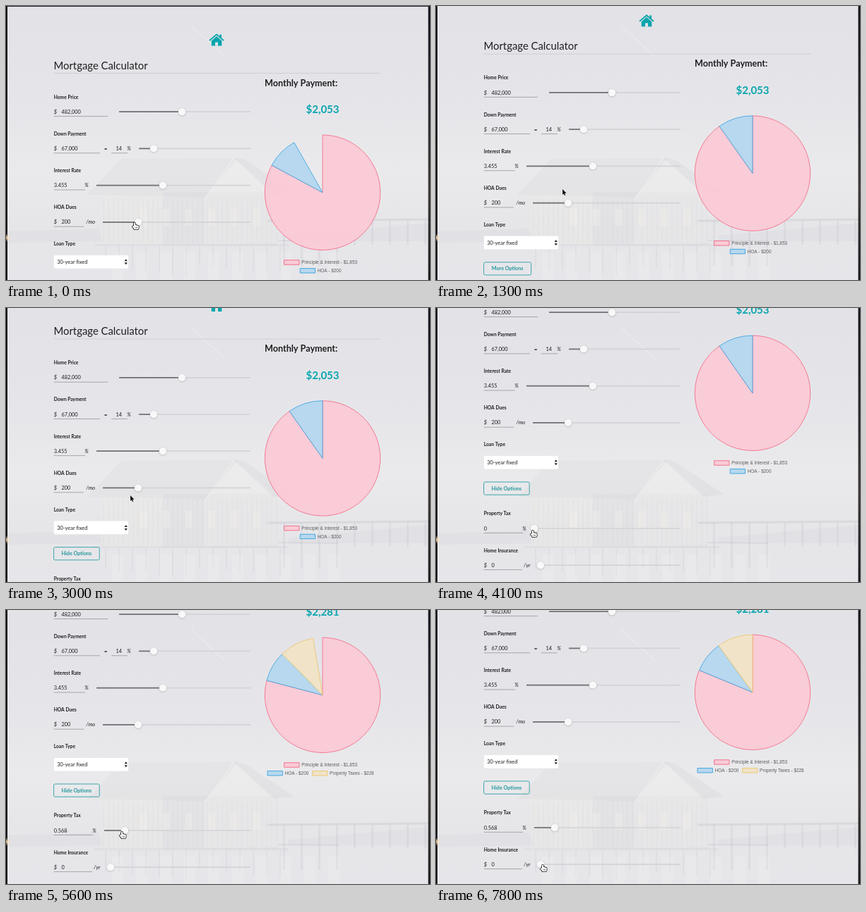
Animation, 600 px wide and 389 px high, one loop 8 s. Source, as an HTML page with a canvas:

```html
<!DOCTYPE html>
<html lang="en">
<head>
<meta charset="utf-8">
<title>Mortgage Calculator</title>
<style>
html, body { margin: 0; width: 100%; height: 100%; overflow: hidden; background: #e4e4e8; }
canvas { display: block; width: 600px; height: 389px; }
</style>
</head>
<body>
<canvas id="stage"></canvas>
<script>
const W = 600, H = 389, LOOP = 8000, STEP = 100;
const TEAL = '#08a5ae', INK = '#1f1f22';
const TOP = 150.2, PITCH = 52.2, OPTIONS_TOP = 457;
const OPEN_AT = 2300;
const PRICE = 482000, LOAN = 1853, DUES = 200;
const canvas = document.getElementById('stage');
const ratio = window.devicePixelRatio || 1;
canvas.width = W * ratio;
canvas.height = H * ratio;
const ctx = canvas.getContext('2d');

// Progress from 0 to 1 between two times
const ramp = (t, from, to) => Math.min(1, Math.max(0, (t - from) / (to - from)));
const mix = (a, b, k) => a + (b - a) * k;
const money = n => '$' + n.toLocaleString('en-US');

const scrollAt = t => 51.4 * ramp(t, 770, 1770) + 92.6 * ramp(t, 3000, 3300) + 4 * ramp(t, 6500, 6700);

function rateAt(t) {
  const r = .384 * ramp(t, 4400, 4767) + .184 * ramp(t, 4900, 5003);
  return Number((Math.round(r / .008) * .008).toFixed(3));
}

// The chart spins in again after every change of the tax rate
const spinStart = t => t <= 4400 ? -465 : Math.min(t - 40, t <= 4900 ? 4767 : 5003);

function pointerAt(t) {
  let p = [182, 308];
  const go = (from, to, x, y) => {
    const k = ramp(t, from, to);
    p = [mix(p[0], x, k), mix(p[1], y, k)];
  };
  go(600, 900, 179, 260);
  go(1800, 2200, 104, 349);
  go(2500, 2800, 176, 266);
  go(3500, 4000, 137, 316);
  go(4400, 4767, 154, 316);
  go(4900, 5003, 164, 315);
  go(6200, 7300, 151, 362);
  return p;
}

const overControl = t => t < 650 || (t > 2100 && t < 2600) || (t >= 4000 && t < 6300) || t > 7100;

function paint(fill, stroke, width = 1) {
  if (fill) { ctx.fillStyle = fill; ctx.fill(); }
  if (stroke) { ctx.strokeStyle = stroke; ctx.lineWidth = width; ctx.stroke(); }
}

function poly(points, fill, stroke, width) {
  ctx.beginPath();
  for (let i = 0; i < points.length; i += 2) ctx.lineTo(points[i], points[i + 1]);
  ctx.closePath();
  paint(fill, stroke, width);
}

function line(x1, y1, x2, y2, color, width) {
  ctx.beginPath();
  ctx.moveTo(x1, y1);
  ctx.lineTo(x2, y2);
  paint(null, color, width);
}

function box(x, y, w, h, r, fill, stroke, width) {
  ctx.beginPath();
  ctx.roundRect(x, y, w, h, r);
  paint(fill, stroke, width);
}

function rect(x, y, w, h, fill) {
  ctx.fillStyle = fill;
  ctx.fillRect(x, y, w, h);
}

function text(s, x, y, size, style = '', color = INK, align = 'left', family = 'Lato, sans-serif') {
  ctx.font = `${style} ${size}px ${family}`;
  ctx.fillStyle = color;
  ctx.textAlign = align;
  ctx.fillText(s, x, y);
}

function shade(stops) {
  const g = ctx.createLinearGradient(0, 0, 0, H);
  stops.forEach((c, i) => g.addColorStop(i / (stops.length - 1), c));
  return g;
}

function backdrop() {
  const dark = a => `rgba(150,150,162,${a})`;
  const warm = a => `rgba(244,240,236,${a})`;
  rect(0, 0, W, H, shade(['#e2e2e7', '#e4e4e8', '#e6e6ea', '#eaeaec', '#e6e6e9', '#e6e6ea']));
  line(262, 28, 310, 72, 'rgba(255,255,255,.45)', 1);

  // far shores
  poly([0, 320, 130, 316, 140, 334, 0, 336], dark(.07));
  poly([400, 326, 600, 308, 600, 334, 400, 334], dark(.07));

  // boathouse: walls, roof, gable
  rect(135, 264, 250, 76, dark(.05));
  rect(135, 264, 87, 76, warm(.35));
  poly([281, 274, 322, 216, 385, 270, 385, 336, 281, 338], warm(.25));
  poly([163, 217, 328, 216, 281, 272, 115, 268], dark(.07));
  poly([322, 215, 338, 218, 408, 265, 378, 268], dark(.09));
  line(322, 216, 281, 274, 'rgba(255,255,255,.35)', 1.2);
  for (let x = 138; x < 384; x += 7) line(x, 272, x, 336, dark(.07), 1);
  for (let x = 190; x < 380; x += 32) rect(x, 288, 10, 24, warm(.3));
  rect(125, 338, 275, 3, dark(.09));

  // stilts, jetty and their reflections
  for (let x = 140; x < 400; x += 19) rect(x, 341, 2, 26 + x % 17, dark(.1));
  line(370, 305, W, 303, dark(.17), 3);
  line(385, 333, 470, 334, dark(.14), 2);
  for (let x = 392; x < W; x += 25) rect(x, 305, 3, x < 480 ? 64 : 34, dark(.12));
  for (let x = 150; x < 470; x += 34) rect(x, 350, 16, 39, warm(.2));

  rect(0, 0, 2, H, '#0c0c12');
  rect(597.5, 0, 3, H, shade(['#101018', '#23232b', '#3b3432', '#15151a']));
  const glow = ctx.createRadialGradient(1, 329, 0, 1, 329, 6);
  glow.addColorStop(0, 'rgba(255,226,180,.9)');
  glow.addColorStop(1, 'rgba(255,226,180,0)');
  rect(0, 322, 8, 14, glow);
}

function slider(from, knob, y) {
  line(from, y, 346, y, '#d3d3d7', 1.7);
  line(from, y, knob, y, '#717075', 1.7);
  ctx.save();
  ctx.shadowColor = 'rgba(0,0,0,.28)';
  ctx.shadowBlur = 2 * ratio;
  ctx.shadowOffsetY = .5 * ratio;
  ctx.beginPath();
  ctx.arc(knob, y, 5.2, 0, 7);
  paint('#f8f8f9');
  ctx.restore();
}

const label = (s, y) => text(s, 67.7, y - 18.6, 6.7, 'bold');
const value = (s, x, y, style) => text(s, x, y + 2.6, 7.4, style);
const rule = (x1, x2, y) => line(x1, y + 6.4, x2, y + 6.4, '#8b8b90', .7);

function field(name, y, amount, end, from, knob, unit = '', dollar = true) {
  label(name, y);
  if (dollar) value('$', 67.7, y, 'italic');
  value(amount, dollar ? 78.5 : 67.7, y);
  rule(67.7, end, y);
  value(unit, end + (unit === '/mo' ? 3.5 : unit === '/yr' ? 2.3 : -.8), y, 'italic');
  slider(from, knob, y);
}

function houseIcon(x, y) {
  ctx.lineJoin = 'miter';
  ctx.beginPath();
  ctx.moveTo(x - 10, y + 1);
  ctx.lineTo(x, y - 7.6);
  ctx.lineTo(x + 10, y + 1);
  paint(null, TEAL, 1.9);
  rect(x + 4.4, y - 7.5, 2.6, 5, TEAL);
  poly([x, y - 5, x + 7.3, y + 1.4, x + 7.3, y + 8.5, x - 7.3, y + 8.5, x - 7.3, y + 1.4], TEAL);
  rect(x - 2, y + 3.5, 4, 5.1, '#e3e3e8');
}

function form(t, rate) {
  const open = t >= OPEN_AT;
  rect(0, 0, W, 1, '#25252c');
  houseIcon(298, 48);
  text('Mortgage Calculator', 67.5, 89.6, 14.85);
  line(68, 95.4, 530, 95.4, '#c9c9ce', .8);

  const y = i => TOP + PITCH * i;
  field('Home Price', y(0), '482,000', 144, 160, 249);
  field('Down Payment', y(1), '67,000', 133, 188, 209);
  value('=', 139, y(1), 'bold');
  value('14', 155.5, y(1));
  rule(149, 172, y(1));
  value('%', 171.3, y(1), 'italic');
  field('Interest Rate', y(2), '3.455', 112, 128, 222, '%', false);
  field('HOA Dues', y(3), '200', 110, 137, 187, '/mo');

  label('Loan Type', y(4));
  box(67.5, 353.5, 106, 19.5, 2, '#fff', '#e3e3e6', .6);
  text('30-year fixed', 72.3, 366, 7.4);
  for (const s of [-1, 1]) poly([167.6, 363.3 + s, 169.7, 363.3 + s * 4, 171.8, 363.3 + s], '#222');

  const width = open ? 64.6 : 67;
  box(67.6, 391, width, 18.2, 2, null, '#2a9fa4', .9);
  text(open ? 'Hide Options' : 'More Options', 67.6 + width / 2, 402.7, 7.2, 'bold', '#23979c', 'center');
  if (!open) return;
  field('Property Tax', OPTIONS_TOP, String(rate), 123, 139, 139 + rate * 51, '%', false);
  field('Home Insurance', OPTIONS_TOP + PITCH, '0', 122, 148, 148, '/yr');
}

function legend(items, y) {
  const gap = 5.33, swatch = 21.3, pad = 3.2;
  const font = '"Liberation Sans", Arial, sans-serif';
  ctx.font = `6.4px ${font}`;
  const widths = items.map(p => swatch + pad + ctx.measureText(p.label).width + gap);
  let x = 448 - widths.reduce((a, b) => a + b) / 2;
  items.forEach((p, i) => {
    box(x, y - 3.2, swatch, 6.4, 0, p.fill, p.edge, 1);
    text(p.label, x + swatch + pad, y + 2.3, 6.4, '', '#5c5c60', 'left', font);
    x += widths[i];
  });
}

function chart(t, rate) {
  const tax = Math.round(PRICE * rate / 1200);
  const total = LOAN + DUES + tax;
  const parts = [
    { name: 'Principle & Interest', n: LOAN, fill: 'rgba(250,203,214,.95)', edge: '#f4708b' },
    { name: 'HOA', n: DUES, fill: 'rgba(181,215,239,.95)', edge: '#45a6e2' },
    { name: 'Property Taxes', n: tax, fill: 'rgba(241,227,199,.95)', edge: '#efc873' }
  ].filter(p => p.n > 0);

  text('Monthly Payment:', 366, 113.7, 12.6, 'bold');
  text(money(total), 448, 152.3, 15, 'bold', TEAL, 'center');

  const k = ramp(t - spinStart(t), 0, 1000);
  const sweep = Math.PI * 2 * (1 - (1 - k) ** 4);
  let a = -Math.PI / 2;
  ctx.lineJoin = 'bevel';
  for (const p of parts) {
    const b = a + sweep * p.n / total;
    ctx.beginPath();
    ctx.moveTo(448, 264.8);
    ctx.arc(448, 264.8, 81.7, a, b);
    ctx.closePath();
    paint(p.fill, p.edge, .9);
    a = b;
    p.label = `${p.name} - ${money(p.n)}`;
  }
  legend(parts.slice(0, 1), 364);
  legend(parts.slice(1), 375.8);
}

function hand() {
  const shape = (fill, stroke) => {
    box(-3.2, 4.3, 4, 2.4, 1.2, fill, stroke, 1.5);
    box(-1, -.3, 2, 7, 1, fill, stroke, 1.5);
    for (let i = 0; i < 3; i++) box(.9 + i * 1.5, 2.8 + i * .5, 1.8, 4, .9, fill, stroke, 1.5);
    box(-1.2, 5, 6.6, 4.3, 1.4, fill, stroke, 1.5);
  };
  shape(null, '#111');
  shape('#fff');
  for (let x = 1; x < 4; x += 1.4) line(x, 5.6, x, 7.8, '#222', .5);
}

function arrow() {
  const shape = [0, 0, 0, 8, 1.8, 6.4, 3, 9.2, 4.3, 8.6, 3.1, 5.9, 5.5, 5.7];
  poly(shape, null, '#fff', 1);
  poly(shape, '#111');
}

function draw(now) {
  const t = Math.floor(now % LOOP / STEP) * STEP;
  const rate = rateAt(t);
  ctx.setTransform(ratio, 0, 0, ratio, 0, 0);
  backdrop();
  ctx.save();
  ctx.translate(0, -scrollAt(t));
  form(t, rate);
  chart(t, rate);
  ctx.restore();
  ctx.save();
  ctx.translate(...pointerAt(t));
  if (overControl(t)) hand(); else arrow();
  ctx.restore();
}

let origin = null;
function loop(now) {
  if (origin === null) origin = now;
  draw(now - origin);
  requestAnimationFrame(loop);
}
draw(0);
requestAnimationFrame(loop);
</script>
</body>
</html>
```
